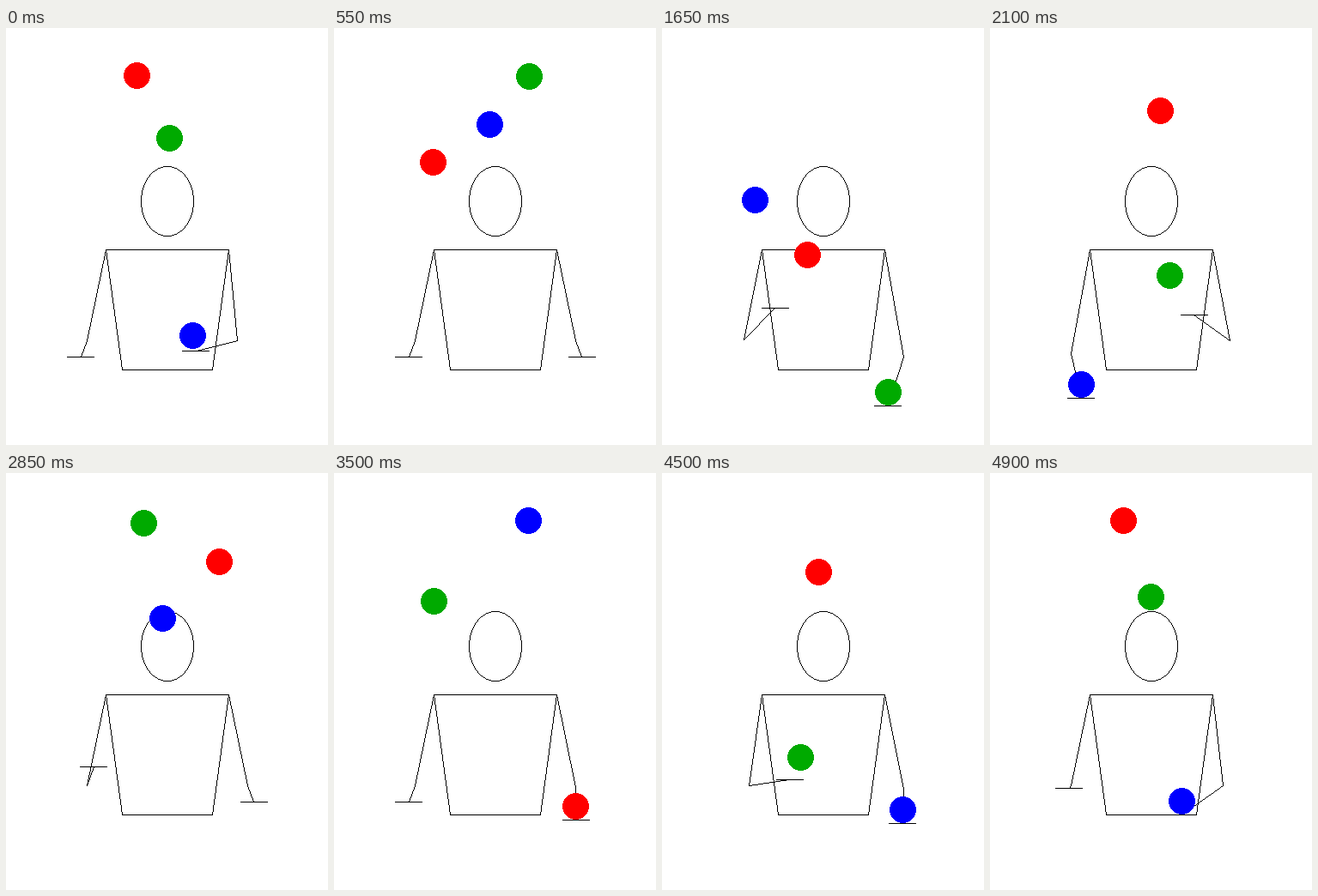
Recreate the animation shown at these times as an HTML page with a canvas. Size 375 by 486 pixels, loop 4.95 s.

```html
<!DOCTYPE html>
<html lang="en">
<head>
<meta charset="utf-8">
<title>Juggler</title>
<style>
  html, body { margin: 0; width: 100%; height: 100%; overflow: hidden; background: #fff; }
  canvas { display: block; }
</style>
</head>
<body>
<canvas id="stage" width="375" height="486"></canvas>
<script>
const ctx = document.getElementById('stage').getContext('2d');
const WIDTH = 375, HEIGHT = 486;
const LOOP = 4950, STEP = 50;
const BEATS = 10, STEPS_PER_BEAT = 9.9, LEAD = 0.3;

// Geometry of the left side; the right side is its mirror image.
const CATCH_X = 86.8, THROW_X = 156.55, REST_Y = 382.55;
const PEAK_Y = 54.47, GRAVITY = 78.28, RADIUS = 15;
const SHOULDER = { x: 116, y: 258 }, WAIST = { x: 135, y: 398 };

const LEFT_CATCHES = [2, 4, 8], RIGHT_CATCHES = [3, 7, 9];
const BALLS = [
  { color: '#f00', thrown: 3 },
  { color: '#0a0', thrown: 9 },
  { color: '#00f', thrown: 5 }
];

const round = Math.round;
const mix = (a, b, t) => a + (b - a) * t;
const since = (u, start) => (u - start + BEATS) % BEATS;
const mirror = p => ({ x: WIDTH - p.x, y: p.y });

function swing(p) {
  const q = 4 * p * (1 - p);
  return 57.3 * q + 4.6 * q * q;
}

const carry = p => ({ x: mix(CATCH_X, THROW_X, p), y: REST_Y + swing(p) });
const goBack = p => ({ x: mix(THROW_X, CATCH_X, p), y: REST_Y - swing(p) });

function handAt(u, catches) {
  for (const start of catches) {
    const p = since(u, start);
    if (p < 1) return carry(p);
    if (p < 2) return goBack(p - 1);
  }
  return { x: CATCH_X, y: REST_Y };
}

function elbowFor(hand) {
  const reach = Math.max(0, hand.x - 125);
  const drop = 0.48 * Math.max(0, hand.y - 400);
  const lift = 0.2 * Math.max(0, 332 - hand.y);
  return { x: 94 + 0.0139 * reach * reach, y: 364 + drop - lift };
}

const flight = v => ({
  x: mix(THROW_X, WIDTH - CATCH_X, v / 4),
  y: PEAK_Y + GRAVITY * (v - 2) ** 2
});

// Four beats in the air and one in the hand, on each side in turn.
function ballAt(u, thrown) {
  const v = since(u, thrown);
  const half = v % 5;
  let p;
  if (half < 4) {
    p = flight(half);
  } else {
    const hand = carry(half - 4);
    p = mirror({ x: hand.x, y: hand.y - RADIUS - 1 });
  }
  return v < 5 ? p : mirror(p);
}

const dot = (x, y) => ctx.fillRect(round(x), round(y), 1, 1);

function line(a, b) {
  const x = round(a.x), y = round(a.y);
  const dx = round(b.x) - x, dy = round(b.y) - y;
  const n = Math.max(Math.abs(dx), Math.abs(dy)) || 1;
  for (let i = 0; i <= n; i++) dot(x + dx * i / n, y + dy * i / n);
}

function ellipse(cx, cy, rx, ry) {
  const diagonal = Math.hypot(rx, ry);
  const across = (d, r, other) => other * Math.sqrt(1 - (d / r) ** 2);
  for (let d = 0.5; d <= rx * rx / diagonal + 0.5; d++) {
    const h = across(d, rx, ry);
    for (const x of [cx - d, cx + d]) { dot(x, cy - h); dot(x, cy + h); }
  }
  for (let d = 0.5; d <= ry * ry / diagonal + 0.5; d++) {
    const w = across(d, ry, rx);
    for (const y of [cy - d, cy + d]) { dot(cx - w, y); dot(cx + w, y); }
  }
}

function disc(p) {
  const x = round(p.x), y = round(p.y), r = RADIUS + 0.5;
  for (let d = -RADIUS; d <= RADIUS; d++) {
    const w = Math.floor(Math.sqrt(r * r - d * d));
    ctx.fillRect(x - w, y + d, 2 * w + 1, 1);
  }
}

function arm(hand, place) {
  const elbow = place(elbowFor(hand));
  const palm = place(hand);
  line(place(SHOULDER), elbow);
  line(elbow, palm);
  ctx.fillRect(round(palm.x - 15.5), round(palm.y), 32, 1);
}

function draw(time) {
  const step = Math.floor((time % LOOP) / STEP);
  const u = ((step + LEAD) / STEPS_PER_BEAT) % BEATS;

  ctx.fillStyle = '#fff';
  ctx.fillRect(0, 0, WIDTH, HEIGHT);

  ctx.fillStyle = '#000';
  ellipse(187.5, 201.5, 30.5, 40.5);
  line(SHOULDER, mirror(SHOULDER));
  line(WAIST, mirror(WAIST));
  line(SHOULDER, WAIST);
  line(mirror(SHOULDER), mirror(WAIST));
  arm(handAt(u, LEFT_CATCHES), p => p);
  arm(handAt(u, RIGHT_CATCHES), mirror);

  for (const ball of BALLS) {
    ctx.fillStyle = ball.color;
    disc(ballAt(u, ball.thrown));
  }
}

function tick() {
  draw(performance.now());
  requestAnimationFrame(tick);
}
tick();
</script>
</body>
</html>
```
